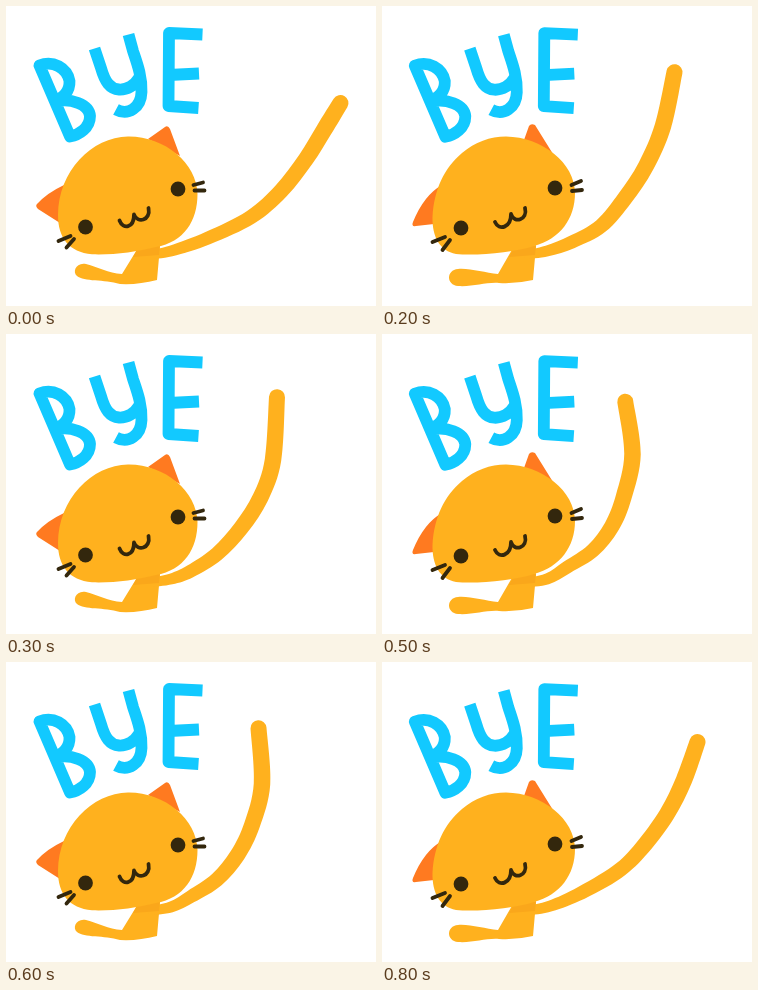
These frames come from a looping animation (370 px wide and 300 px high, 900 ms). An HTML page:

```html
<!DOCTYPE html>
<html lang="en">
<head>
<meta charset="utf-8">
<title>Waving cat</title>
<style>
  html, body { margin: 0; width: 100%; height: 100%; overflow: hidden; background: #fff; }
  svg { display: block; width: 370px; height: 300px; }
  .fur { fill: #ffb11e; }
  .ear { fill: #ff7a20; }
  .shade { fill: #faa71b; }
  .eye { fill: #33270d; }
  .line { fill: none; stroke: #33270d; stroke-width: 3.8; stroke-linecap: round; stroke-linejoin: round; }
  .letter { fill: none; stroke: #12c9ff; stroke-width: 11.8; stroke-linejoin: round; }
</style>
</head>
<body>
<svg id="stage" viewBox="0 0 370 300" role="img" aria-label="BYE"></svg>
<script>
const STEP = 100;
const ARM_STEPS = [0, 1, 2, 3, 4, 4.5, 4, 3, 1];
const stage = document.getElementById('stage');

// Centre lines of the waving arm, shoulder to paw, from far right to far left.
const ARMS = [
  '142 249 165 245 202 232 245 211 275 185 300 153 318 124 334.5 97',
  '142 249 165 245 195 233 235 210 260 186 285 152 302 118 315.5 80',
  '142 249 165 245 190 236 219 220 243 192 264 160 281 120 292.5 66',
  '142 249 165 245 184 237.5 211 220 235 194 254.5 163.5 267 126 271 63',
  '142 249 165 245 185 234.5 211 217.5 231.5 193 246 163 256 122 252.5 66'
].map(line => line.split(' ').map(Number));
const ARM_WIDTHS = [9, 11, 13, 14.5, 15.5, 16, 16.5, 16];

const LETTERS = [
  'M33.5 59.5C47 54 61 62 63.5 75C64 86 57 91 49 95.5C65 92 83 98 84 110C84 122 73 129 64 130.5Z',
  'M88.5 42.5L95 62C99 76 104 83 113 83.5C121 84 129 79 133 72M122.5 28.5L127 45C131 57 136 70 135.5 86C135 102 122 110 110 103.5',
  'M196.5 28.5L163 27L162.5 100L192.5 102M163 69L193 67.5'
];

const ROUND_HEAD = 'M122 130.5C158 130 191 157 191.5 188C191.5 215 178 236 150 241C130 246 108 249 86 248.3C63 246 52 232 52 209C52 165 86 131 122 130.5Z';
const WIDE_HEAD = 'M124 130.5C160 131 193 157 193 187C193 213 178 233 152 240C132 246.5 95 250 74 248C58 245 50 231 50.5 211C52 184 62 162 80 147C93 136 108 130.5 124 130.5Z';

const POSES = [
  {
    head: ROUND_HEAD, textShift: '0 0',
    ears: 'M58 179Q41 187 31 198Q29 200 32 203L54 217ZM142 133L159 121Q162 119 164 123L174 150Z',
    body: 'M132 242L116 268C102 267 92 261 80 258C70 256 66 266 71 270C78 276 98 273 114 278Q132 279 151 274L154 240Z',
    eyes: [[79.5, 221], [172, 183]],
    whiskers: 'M52.5 235L64.5 230M60.5 241.5L68 233M187.5 179L197 176.5M188.5 184.5L198.5 184.5',
    mouth: 'M113.5 214.5C117 223.5 128 222.5 128 208.5C131 217.5 145 215 142.5 202'
  },
  {
    head: WIDE_HEAD, textShift: '-1.2 .5',
    ears: 'M60 179Q44 187 31 207Q29.5 210 33 212L52 219ZM143 134L154 119Q156 117 159 120L172 149Z',
    body: 'M131 242L116 267C103 266 88 262 76 261C65 261 64 276 76 276C91 277 105 275 117 277Q134 279 151 275L154 240Z',
    eyes: [[78, 221.5], [173, 181.5]],
    whiskers: 'M52 235.5L63.5 230.5M60.5 245.5L67 235M188 178.5L197 174M189.5 184.5L199.5 182.5',
    mouth: 'M112 217C116 225 130 223 128 209.5C133 218 147 215 144.5 201'
  },
  {
    head: WIDE_HEAD, textShift: '-.7 .2',
    ears: 'M60 179Q42 189 31 216Q29 221 34 220L52 218ZM142 134L147 120Q149 117 153 119L171 148Z',
    body: 'M131 242L116 268C103 267 88 262 76 263C64 264 64 279 76 280C91 281 104 276 117 277Q134 278 151 274L154 240Z',
    eyes: [[79, 222], [173, 182]],
    whiskers: 'M50.5 236L63 231M60.5 244L68 234M189.5 179L199 175M190 185L200 184',
    mouth: 'M113 216C117 225 129 222 129 208C132 218 146 214 143 202'
  }
];

function armPoints(position) {
  const i = Math.min(Math.floor(position), ARMS.length - 2);
  const t = position - i;
  return ARM_WIDTHS.map((_, k) => [0, 1].map(axis => {
    const a = ARMS[i][2 * k + axis];
    return a + (ARMS[i + 1][2 * k + axis] - a) * t;
  }));
}

// Catmull-Rom spline, continuing from the first point.
function spline(points) {
  const at = i => points[Math.max(0, Math.min(points.length - 1, i))];
  return points.slice(1).map((p, i) => {
    const from = points[i], before = at(i - 1), after = at(i + 2);
    const c1 = from.map((v, n) => v + (p[n] - before[n]) / 6);
    const c2 = p.map((v, n) => v - (after[n] - from[n]) / 6);
    return 'C' + [...c1, ...c2, ...p].map(v => v.toFixed(2)).join(' ');
  }).join('');
}

function armPath(position) {
  const centre = armPoints(position), last = centre.length - 1;
  const edge = side => centre.map(([x, y], i) => {
    const a = centre[Math.max(0, i - 1)], b = centre[Math.min(last, i + 1)];
    const dx = b[0] - a[0], dy = b[1] - a[1];
    const offset = side * ARM_WIDTHS[i] / 2 / Math.hypot(dx, dy);
    return [x + dy * offset, y - dx * offset];
  });
  const upper = edge(1), lower = edge(-1).reverse();
  const r = ARM_WIDTHS[last] / 2;
  return `M${upper[0]}${spline(upper)}A${r} ${r} 0 0 1 ${lower[0]}${spline(lower)}Z`;
}

const path = (cls, d, extra = '') => `<path class="${cls}" d="${d}" ${extra}/>`;

function picture(position, i) {
  const pose = POSES[i % POSES.length];
  return LETTERS.map(d => path('letter', d, `transform="translate(${pose.textShift})"`)).join('') +
    path('ear', pose.ears) +
    path('fur', pose.body) +
    path('fur', armPath(position)) +
    path('shade', 'M132 242L154 239L153 249L127 251Z') +
    path('fur', pose.head) +
    pose.eyes.map(([x, y]) => `<circle class="eye" cx="${x}" cy="${y}" r="7.4"/>`).join('') +
    path('line', pose.whiskers) +
    path('line', pose.mouth);
}

const pictures = ARM_STEPS.map(picture);
const start = performance.now();
let shown = -1;

function draw(now) {
  const step = Math.floor(Math.max(0, now - start) / STEP) % pictures.length;
  if (step !== shown) stage.innerHTML = pictures[shown = step];
}

function tick(now) {
  draw(now);
  requestAnimationFrame(tick);
}

draw(start);
requestAnimationFrame(tick);
</script>
</body>
</html>
```
